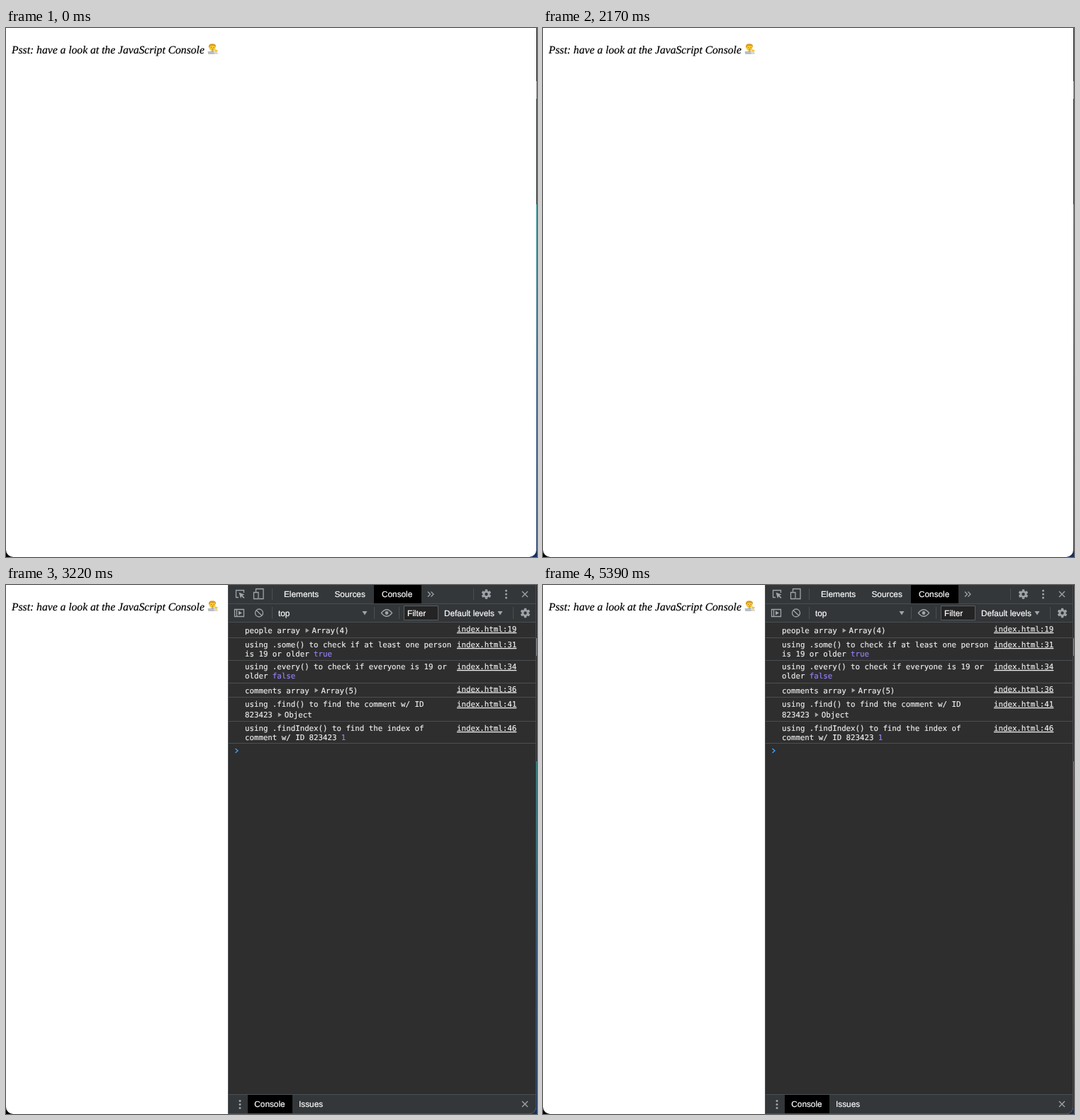
An HTML page that plays this animation: 749x747 px, repeating every 5460 ms.

```html
<!DOCTYPE html>
<html lang="en">
<head>
<meta charset="utf-8">
<title>JavaScript Console</title>
<style>
  html, body { margin: 0; width: 100%; height: 100%; overflow: hidden; background: #000; }
  svg { display: block; text-rendering: geometricPrecision; }
  .page { font: italic 15.62px "Liberation Serif", "Times New Roman", serif; stroke: #000; stroke-width: .2; }
  .ui { font: 11.8px "Liberation Sans", Arial, sans-serif; fill: #fff; stroke: #fff; stroke-width: .2; }
  .log { font: 10.75px "DejaVu Sans Mono", monospace; }
  .log text { fill: #f2f2f2; stroke: #f2f2f2; stroke-width: .15; }
  .log .value { fill: #9980ff; stroke: #9980ff; }
  .link { text-decoration: underline; }
  .icon { fill: none; stroke: #a0a4a8; stroke-width: 1.3; }
  .solid { fill: #a0a4a8; }
  .rule { stroke: #4b4f53; fill: none; }
</style>
</head>
<body>
<svg width="749" height="747" viewBox="0 0 749 747">
  <defs>
    <linearGradient id="desk" x2="0" y2="1">
      <stop offset=".1" stop-color="#202224"/>
      <stop offset=".1" stop-color="#85888a"/>
      <stop offset=".134" stop-color="#85888a"/>
      <stop offset=".134" stop-color="#26282b"/>
      <stop offset=".334" stop-color="#26282b"/>
      <stop offset=".334" stop-color="#2c8d8c"/>
      <stop offset=".5" stop-color="#347a90"/>
      <stop offset=".7" stop-color="#284f80"/>
      <stop offset="1" stop-color="#16305f"/>
    </linearGradient>
    <clipPath id="window"><path d="M313 0H748V737a10 10 0 0 1-10 10H313z"/></clipPath>
    <g id="dots" class="solid"><circle cy="-5" r="1.5"/><circle r="1.5"/><circle cy="5" r="1.5"/></g>
    <path id="close" class="icon" d="M-4-4 4 4M4-4-4 4"/>
    <path id="tooth" d="M-1.5-6.8h3l.5 2.6h-4zM-1.5 6.8h3l.5-2.6h-4z"/>
    <g id="gear" class="solid">
      <circle r="3.5" fill="none" stroke="#a0a4a8" stroke-width="2.6"/>
      <use href="#tooth"/>
      <use href="#tooth" transform="rotate(60)"/>
      <use href="#tooth" transform="rotate(120)"/>
    </g>
  </defs>

  <path fill="url(#desk)" d="M700 0h49v747h-49z"/>
  <path fill="#fff" d="M0 0H748V737a10 10 0 0 1-10 10H10A10 10 0 0 1 0 737z"/>
  <text class="page" x="8" y="35.5">Psst: have a look at the JavaScript Console</text>

  <g id="emoji">
    <path fill="#d9d9d6" d="M285 37q0-5 7-5t7 5z"/>
    <path fill="#8d9298" d="m290 32 1.500 3 1.500-3z"/>
    <circle cx="291" cy="27.500" r="4.500" fill="#fbc92f"/>
    <path fill="#d79b22" d="M286 28q-1-5.800 5-5.800t5 5.300l-1.500-2.300-5.500-.2z"/>
    <path stroke="#6d5026" stroke-width=".8" d="M289 27.500h1m2.500 0h1m-3 2.500h2"/>
    <path fill="#f3c33b" d="m294.500 30 4.500 1.500-2 2.500-3-2z"/>
    <path fill="#b9bdc1" d="M284.500 33h8l1.500 4h-8.500z"/>
  </g>

  <g id="panel" clip-path="url(#window)">
    <path fill="#2e2e2e" d="M313 0h435v747H313z"/>
    <path fill="#33373a" d="M314 0h433v26H314z"/>
    <path fill="#000" d="M519 0h67v26h-67z"/>
    <path class="rule" d="M313 26.500h434M375.500 5v16M659.500 5v16"/>
    <path class="icon" d="M328 17.500h-3.500V7.500h11v3.500"/>
    <path class="solid" d="m328.500 10.500 8 3-3 1.300 3 3-1.200 1.200-3-3-1.300 3z"/>
    <path class="icon" d="M352.500 9.500V5.500h10.500v14h-6M349.500 10.500h6.500v9h-6.500z"/>
    <path class="icon" d="m595 9.500 3.500 3.500-3.500 3.500m4.500-7 3.500 3.500-3.500 3.500"/>
    <use href="#gear" x="677.500" y="13"/>
    <use href="#dots" x="705.500" y="13"/>
    <use href="#close" x="732" y="13"/>
    <g class="ui">
      <text x="392" y="17">Elements</text>
      <text x="463.500" y="17">Sources</text>
      <text x="530" y="17">Console</text>
    </g>

    <g id="content">
      <path fill="#333638" d="M314 27h433v25H314z"/>
      <path class="rule" d="M314 52.500h433M375.500 31v17M519.500 31v17M554.500 31v17M715.500 31v17"/>
      <path class="icon" d="M322.500 34.500h13v10h-13zM325.500 34.500v10"/>
      <path class="solid" d="m328 36.500 5 3-5 3z"/>
      <path class="icon" d="M351.500 39.500a5.500 5.500 0 1 0 11 0a5.500 5.500 0 1 0-11 0M353.200 35.700l7.600 7.600"/>
      <path class="solid" d="M502.500 37h7l-3.500 5.500zM693.500 37h7l-3.500 5.500z"/>
      <path class="icon" d="M529.500 39.500q7.500-9.500 15 0q-7.500 9.500-15 0z"/>
      <circle class="solid" cx="537" cy="39.500" r="2.400"/>
      <path fill="#242424" stroke="#5c5f62" d="M561.500 29.500h48v20h-48z"/>
      <use href="#gear" x="732.500" y="39.500"/>
      <g class="ui">
        <text x="384" y="43.500">top</text>
        <text x="566" y="44">Filter</text>
        <text x="618" y="43.500">Default levels</text>
      </g>
      <g class="log" id="log"></g>
      <path fill="none" stroke="#3d9bf0" stroke-width="1.500" d="m323.500 231 3.500 3-3.500 3"/>
    </g>

    <g id="drawer">
      <path fill="#33373a" d="M314 337h433v26H314z"/>
      <path fill="#000" d="M341 337h63v26h-63z"/>
      <path class="rule" d="M314 336.500h433M314 363.500h433"/>
      <use href="#dots" x="330" y="350.500"/>
      <use href="#close" x="732" y="350"/>
      <g class="ui"><text x="350.300" y="354">Console</text><text x="413" y="354">Issues</text></g>
    </g>
    <path class="rule" d="M313.500 0v747M747.500 0v737a9.500 9.500 0 0 1-9.500 9.500H314"/>
  </g>
</svg>
<script>
const $ = id => document.getElementById(id);
const LOOP = 5460, OPEN = 3080, LOGGED = 3220;
const CHAR = 6.47, LEFT = 337;

// Each entry: link line, link baseline, bottom rule, then [baseline, text, value, kind].
const entries = [
  [19, 66, 74.5, [68, 'people array', 'Array(4)', 'object']],
  [31, 88, 106.5, [88, 'using .some() to check if at least one person'], [101, 'is 19 or older', 'true', 'value']],
  [34, 119, 138.5, [119, 'using .every() to check if everyone is 19 or'], [132, 'older', 'false', 'value']],
  [36, 150.5, 158.5, [152.5, 'comments array', 'Array(5)', 'object']],
  [41, 172, 192.5, [172, 'using .find() to find the comment w/ ID'], [187, '823423', 'Object', 'object']],
  [46, 206, 223.5, [206, 'using .findIndex() to find the index of'], [219, 'comment w/ ID 823423', '1', 'value']]
];

const text = (x, y, str, cls = '') => `<text x="${x}" y="${y}" class="${cls}">${str}</text>`;

function line([y, str, value, kind]) {
  let x = LEFT + (str.length + 1) * CHAR, out = text(LEFT, y, str);
  if (kind === 'object') {
    out += `<path class="solid" d="M${x + 1.5} ${y - 7}l5 3.200-5 3.200z"/>`;
    x += 10.5;
  }
  return value ? out + text(x, y, value, kind) : out;
}

$('log').innerHTML = entries.map(([no, y, rule, ...lines]) =>
  lines.map(line).join('') + text(636, y, 'index.html:' + no, 'link') +
  `<path class="rule" d="M314 ${rule}h433"/>`).join('');

const show = (id, on) => $(id).style.display = on ? '' : 'none';

function draw() {
  const t = performance.now() % LOOP, logged = t >= LOGGED;
  show('panel', t >= OPEN);
  show('content', logged);
  $('drawer').setAttribute('transform', `translate(0 ${logged ? 383 : 0})`);
  requestAnimationFrame(draw);
}
draw();
</script>
</body>
</html>
```
